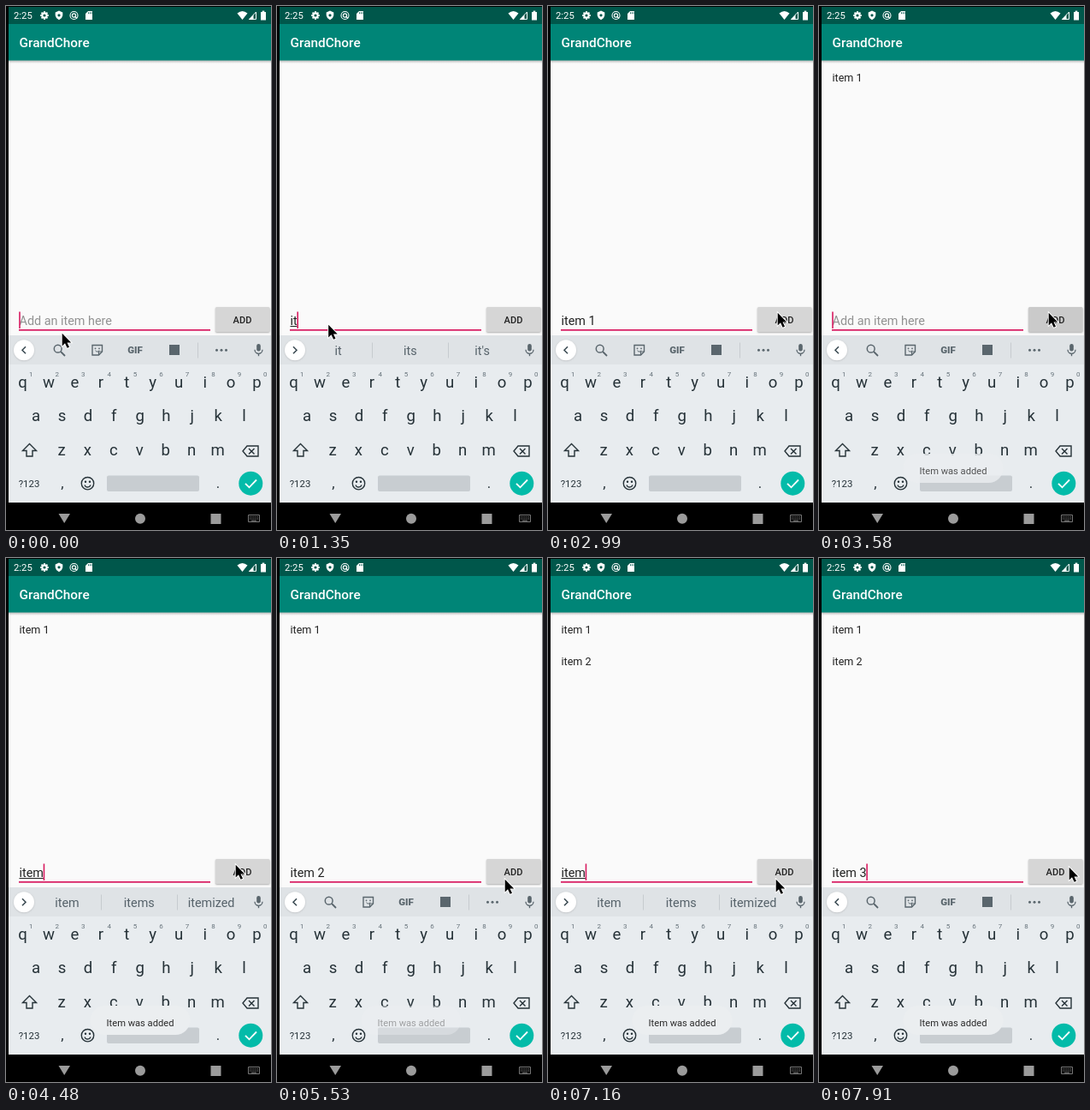
Recreate the animation shown at these times as an HTML page with a canvas. Size 310 px wide and 611 px high, loop 8 s.

```html
<!DOCTYPE html>
<html lang="en">
<head>
<meta charset="utf-8">
<title>To-do list</title>
<style>
html, body { margin: 0; width: 100%; height: 100%; overflow: hidden; background: #000; }
canvas { display: block; width: 310px; height: 611px; }
</style>
</head>
<body>
<canvas id="stage"></canvas>
<script>
const W = 310, H = 611, LOOP = 8000;
const canvas = document.getElementById('stage');
const c = canvas.getContext('2d');
const ratio = window.devicePixelRatio || 1;
canvas.width = W * ratio;
canvas.height = H * ratio;

const INK = '#263238', ICON = '#5a666d', PINK = '#d81b60';
const I_WORDS = ['I', 'in', 'is'];
const IT_WORDS = ['it', 'its', "it's"];
const ITEM_WORDS = ['item', 'items', 'itemized'];
const NEXT_WORDS = ['is', 'and', 'in'];

const START = {
  text: '', composing: false, caret: true, words: null, mouse: [65, 381],
  items: 0, fade: 1, toast: 0, press: 0
};

// Each step changes part of the state from its time on.
const STEPS = [
  [150, { mouse: [59.5, 371] }],
  [600, { caret: false }],
  ...typing([1050, 1350, 1500]),
  [1950, { text: 'item ', composing: false, words: NEXT_WORDS }],
  [2100, { text: 'item 1' }],
  [2240, { words: null }],
  [2690, { caret: false }],
  [2840, { mouse: [180, 365] }],
  [2990, { mouse: [268, 357] }],
  ...adding(3290, 1),
  ...typing([4180, 4330, 4480]),
  [4780, { text: 'item ', composing: false, words: NEXT_WORDS }],
  [4930, { text: 'item 2' }],
  [5080, { words: null, mouse: [266, 374] }],
  [5530, { caret: false, toast: 0.4 }],
  [5680, { toast: 0 }],
  [5830, { caret: true, press: 0.5 }],
  ...adding(5980, 2),
  ...typing([6870, 7020, 7160]),
  [7460, { text: 'item ', composing: false, words: NEXT_WORDS }],
  [7610, { text: 'item 3' }],
  [7760, { words: null }],
  [7910, { mouse: [292, 360] }]
];

function typing([a, b, d]) {
  return [
    [a, { text: 'i', composing: true, caret: true, words: I_WORDS }],
    [b, { text: 'it', words: IT_WORDS }],
    [d, { text: 'item', words: ITEM_WORDS }]
  ];
}

function adding(t, count) {
  return [
    [t, { press: 1, caret: true }],
    [t + 145, { text: '', items: count, fade: 0.3, toast: 0.3 }],
    [t + 290, { fade: 1, toast: 0.8, press: 0.35 }],
    [t + 440, { toast: 1, press: 0 }],
    [t + 590, { caret: false }]
  ];
}

function stateAt(t) {
  const s = { ...START };
  for (const [at, change] of STEPS) if (t >= at) Object.assign(s, change);
  return s;
}

function rect(x, y, w, h, color) {
  c.fillStyle = color;
  c.fillRect(x, y, w, h);
}

function round(x, y, w, h, r) {
  c.beginPath();
  c.roundRect(x, y, w, h, r);
}

function disc(x, y, r, color) {
  c.fillStyle = color;
  c.beginPath();
  c.arc(x, y, r, 0, 7);
  c.fill();
}

function ring(x, y, r, color, width, from = 0, to = Math.PI * 2) {
  c.strokeStyle = color;
  c.lineWidth = width;
  c.beginPath();
  c.arc(x, y, r, from, to);
  c.stroke();
}

function trace(points, closed) {
  c.beginPath();
  points.forEach(([x, y]) => c.lineTo(x, y));
  if (closed) c.closePath();
}

function line(points, color, width, closed) {
  trace(points, closed);
  c.strokeStyle = color;
  c.lineWidth = width;
  c.stroke();
}

function shape(points, color) {
  trace(points, true);
  c.fillStyle = color;
  c.fill();
}

function label(str, x, y, size, color, align = 'left', weight = 400) {
  c.font = `${weight} ${size}px Roboto, sans-serif`;
  c.textAlign = align;
  c.fillStyle = color;
  c.fillText(str, x, y);
}

function statusBar() {
  rect(3, 1, 307, 20, '#00574b');
  label('2:25', 9, 15, 11.3, '#fff');

  for (let i = 0; i < 8; i++) {
    const a = i * Math.PI / 4;
    line([[45, 11], [45 + 4.9 * Math.cos(a), 11 + 4.9 * Math.sin(a)]], '#fff', 1.8);
  }
  disc(45, 11, 3.7, '#fff');
  disc(45, 11, 1.6, '#00574b');

  shape([[62, 5.5], [66.3, 7.4], [66.3, 11], [65, 14], [62, 16.3], [59, 14], [57.7, 11], [57.7, 7.4]], '#fff');
  disc(62, 10.8, 1.6, '#00574b');

  ring(79.5, 11, 4.5, '#fff', 1.1);
  ring(79.5, 11, 2.1, '#fff', 1.1);
  line([[80.5, 12], [83, 14.5]], '#fff', 1.2);

  shape([[96, 6], [101, 6], [101, 16], [93, 16], [93, 9]], '#fff');
  for (const x of [96, 97.8, 99.6]) rect(x, 7.2, 0.8, 2, '#00574b');

  c.fillStyle = '#fff';
  c.beginPath();
  c.moveTo(276.5, 16);
  c.lineTo(270.5, 8.6);
  c.quadraticCurveTo(276.5, 3.6, 282.5, 8.6);
  c.fill();
  line([[284.5, 15.4], [292.5, 15.4], [292.5, 7], [284.5, 15.4]], '#fff', 1);
  shape([[284, 16], [289.5, 16], [289.5, 10.2]], '#fff');
  rect(298, 7, 6, 9.5, '#fff');
  rect(299.7, 5.6, 2.6, 2, '#fff');
}

function page(s) {
  rect(3, 63, 307, 321, '#fafafa');
  const shade = c.createLinearGradient(0, 63, 0, 67);
  shade.addColorStop(0, 'rgba(0,0,0,.28)');
  shade.addColorStop(1, 'rgba(0,0,0,0)');
  rect(3, 63, 307, 4, shade);
  rect(3, 21, 307, 42.5, '#008577');
  label('GrandChore', 15.5, 48, 15.4, '#fff', 'left', 500);

  for (let i = 1; i <= s.items; i++) {
    c.globalAlpha = i === s.items ? s.fade : 1;
    label('item ' + i, 15.5, 50 + 37.5 * i, 12.6, '#212121');
  }
  c.globalAlpha = 1;
}

function entry(s) {
  label(s.text || 'Add an item here', 15.5, 371.5, 14.4, s.text ? '#212121' : '#929292');
  const width = s.text ? c.measureText(s.text).width : 0;
  if (s.composing) rect(15.5, 373, width, 1, '#212121');
  if (s.caret) rect(15.2 + width, 356.5, 1.6, 19.5, PINK);
  rect(15, 377, 224, 1.7, PINK);

  const tone = 214 - 34 * s.press;
  c.save();
  c.shadowColor = 'rgba(0,0,0,.3)';
  c.shadowBlur = 2 * ratio;
  c.shadowOffsetY = ratio;
  c.fillStyle = `rgb(${tone},${tone},${tone})`;
  round(245, 351, 63.5, 29, 1.5);
  c.fill();
  c.restore();
  label('ADD', 276.5, 369.8, 11.1, '#212121', 'center', 500);
}

function tools() {
  ring(60.7, 399.7, 4.4, ICON, 1.5);
  line([[64, 403], [69, 408]], ICON, 1.8);

  line([[101, 395.5], [112.5, 395.5], [112.5, 403], [108.5, 407], [101, 407]], ICON, 1.4, true);
  line([[112.5, 403], [108.5, 403], [108.5, 407]], ICON, 1.2);
  disc(104.5, 399.3, 0.9, ICON);
  disc(109, 399.3, 0.9, ICON);
  ring(106.8, 400.8, 2.3, ICON, 1, 0.3, 2.8);

  label('GIF', 151, 405.3, 11.5, ICON, 'center', 900);
  rect(191, 395, 12, 12, ICON);
  rect(224, 392.5, 1, 18, '#c6cbcf');
  for (const x of [246.5, 252, 257.5]) disc(x, 401.2, 1.5, ICON);
}

function strip(s) {
  rect(3, 384, 307, 34.5, '#dfe3e6');
  c.save();
  c.shadowColor = 'rgba(0,0,0,.18)';
  c.shadowBlur = 2 * ratio;
  c.shadowOffsetY = 0.5 * ratio;
  disc(21, 401.3, 12, '#fff');
  c.restore();
  const d = s.words ? -2 : 2;
  line([[21 + d, 397.2], [21 - d, 401.2], [21 + d, 405.2]], '#37474f', 1.5);

  if (s.words) {
    s.words.forEach((word, i) => label(word, 71.5 + 84.3 * i, 406.6, 14.4, '#56626a', 'center'));
    rect(111, 392.5, 1, 18, '#c6cbcf');
    rect(200, 392.5, 1, 18, '#c6cbcf');
  } else {
    tools();
  }

  c.fillStyle = ICON;
  round(293.2, 394, 4.6, 8.6, 2.3);
  c.fill();
  ring(295.5, 400.8, 4.5, ICON, 1.3, 0, Math.PI);
  line([[295.5, 405], [295.5, 408.2]], ICON, 1.4);
}

function keyRow(keys, x, y) {
  [...keys].forEach((key, i) => label(key, x + 30.45 * i, y, 18.6, INK, 'center'));
}

function keyboard() {
  rect(3, 418, 307, 161, '#e8ecef');
  keyRow('qwertyuiop', 19.5, 444.5);
  [...'1234567890'].forEach((n, i) => label(n, 29.3 + 30.45 * i, 432, 8, '#66727a', 'center'));
  keyRow('asdfghjkl', 35, 484);
  keyRow('zxcvbnm', 65, 524);

  line([[27.5, 510.5], [35.5, 518.5], [31, 518.5], [31, 525], [24, 525], [24, 518.5], [19.5, 518.5]], INK, 1.4, true);
  line([[282, 513], [295, 513], [295, 525], [282, 525], [277, 519]], INK, 1.4, true);
  line([[284, 516], [290.5, 522.5]], INK, 1.4);
  line([[290.5, 516], [284, 522.5]], INK, 1.4);

  label('?123', 27, 561, 11.4, INK, 'center');
  label(',', 66, 561.5, 17, INK, 'center');
  label('.', 248, 561.5, 17, INK, 'center');
  ring(95.5, 556.7, 7.2, INK, 1.4);
  disc(93, 554.7, 1.2, INK);
  disc(98, 554.7, 1.2, INK);
  ring(95.5, 557.2, 3.8, INK, 1.3, 0.35, 2.8);

  c.fillStyle = '#c8cdd1';
  round(118, 547.5, 108, 18.5, 2);
  c.fill();
  disc(286.3, 556.7, 14, '#03bba9');
  line([[280, 556.8], [284.5, 561.3], [293, 552.5]], '#fff', 1.8);
}

function toast(alpha) {
  if (!alpha) return;
  c.globalAlpha = alpha;
  c.fillStyle = '#ebeef0';
  round(98.5, 522, 117, 34, 17);
  c.fill();
  label('Item was added', 157, 545.8, 11.15, '#2a2a2a', 'center');
  c.globalAlpha = 1;
}

function navBar() {
  const gray = '#9b9b9b';
  shape([[61.5, 592], [75, 592], [68.2, 603]], gray);
  disc(157, 597.7, 6, gray);
  rect(239.5, 592, 12, 12, gray);
  line([[283.5, 593.5], [296.5, 593.5], [296.5, 601.5], [283.5, 601.5]], '#777', 1, true);
  for (let i = 0; i < 10; i++) rect(285 + 2.2 * (i % 5), 595.2 + 2.2 * Math.floor(i / 5), 1.1, 1.1, '#888');
  rect(287, 599.6, 6, 1, '#888');
}

function pointer([x, y]) {
  c.save();
  c.translate(x + 0.7, y + 0.8);
  const arrow = [[0, 0], [0, 14.6], [3.3, 11.5], [5.9, 17], [8.3, 15.9], [5.8, 10.6], [10.5, 10.6]];
  line(arrow, '#fff', 1.8, true);
  shape(arrow, '#000');
  c.restore();
}

function draw() {
  const s = stateAt(performance.now() % LOOP);
  c.setTransform(ratio, 0, 0, ratio, 0, 0);
  rect(0, 0, W, H, '#000');
  statusBar();
  page(s);
  entry(s);
  strip(s);
  keyboard();
  toast(s.toast);
  navBar();
  pointer(s.mouse);
  requestAnimationFrame(draw);
}
draw();
</script>
</body>
</html>
```
